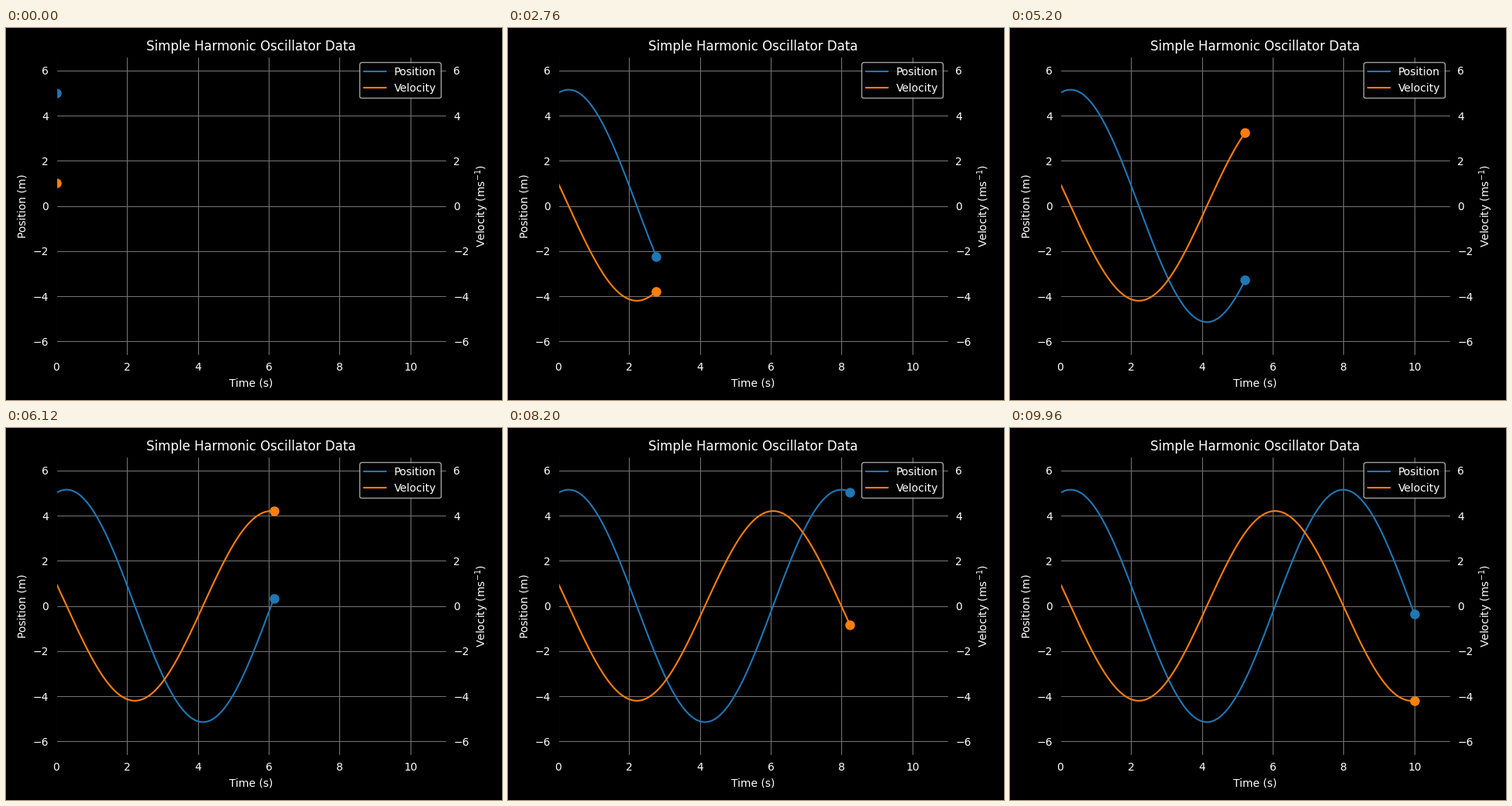
These frames come from a looping animation (640x480 px, 10 s). A matplotlib script:

```python
import numpy as np
import matplotlib.pyplot as plt
from matplotlib.animation import FuncAnimation

FRAMES = 250
INTERVAL = 40
X0, V0 = 5.0, 1.0
OMEGA = np.sqrt(2 / 3)
LIMIT = 6.6

plt.rcParams["font.family"] = "DejaVu Sans"

t = np.linspace(0, 10, FRAMES)
position = X0 * np.cos(OMEGA * t) + V0 / OMEGA * np.sin(OMEGA * t)
velocity = V0 * np.cos(OMEGA * t) - X0 * OMEGA * np.sin(OMEGA * t)

fig, ax = plt.subplots(figsize=(6.4, 4.8), dpi=100, facecolor="black")
ax_v = ax.twinx()


def style(axes, label):
    axes.set_facecolor("black")
    axes.set_ylim(-LIMIT, LIMIT)
    axes.set_ylabel(label, color="white")
    axes.tick_params(labelcolor="white")


def add_trace(axes, color, label):
    line, = axes.plot([], [], color=color, label=label)
    dot, = axes.plot([], [], "o", color=color, markersize=8)
    return line, dot


style(ax, "Position (m)")
style(ax_v, "Velocity (ms$^{-1}$)")
ax.set_xlim(0, 11)
ax.set_xlabel("Time (s)", color="white")
ax.set_title("Simple Harmonic Oscillator Data", color="white")
ax.grid(color="#707070")

traces = [
    (*add_trace(ax, "tab:blue", "Position"), position),
    (*add_trace(ax_v, "tab:orange", "Velocity"), velocity),
]
ax_v.legend(handles=[line for line, _, _ in traces], loc="upper right",
            facecolor="black", labelcolor="white")
fig.tight_layout()


def update(i):
    for line, dot, values in traces:
        line.set_data(t[:i + 1], values[:i + 1])
        dot.set_data(t[i:i + 1], values[i:i + 1])
    return [artist for line, dot, _ in traces for artist in (line, dot)]


anim = FuncAnimation(fig, update, frames=FRAMES, interval=INTERVAL,
                     repeat=True, repeat_delay=0)
plt.show()
```
